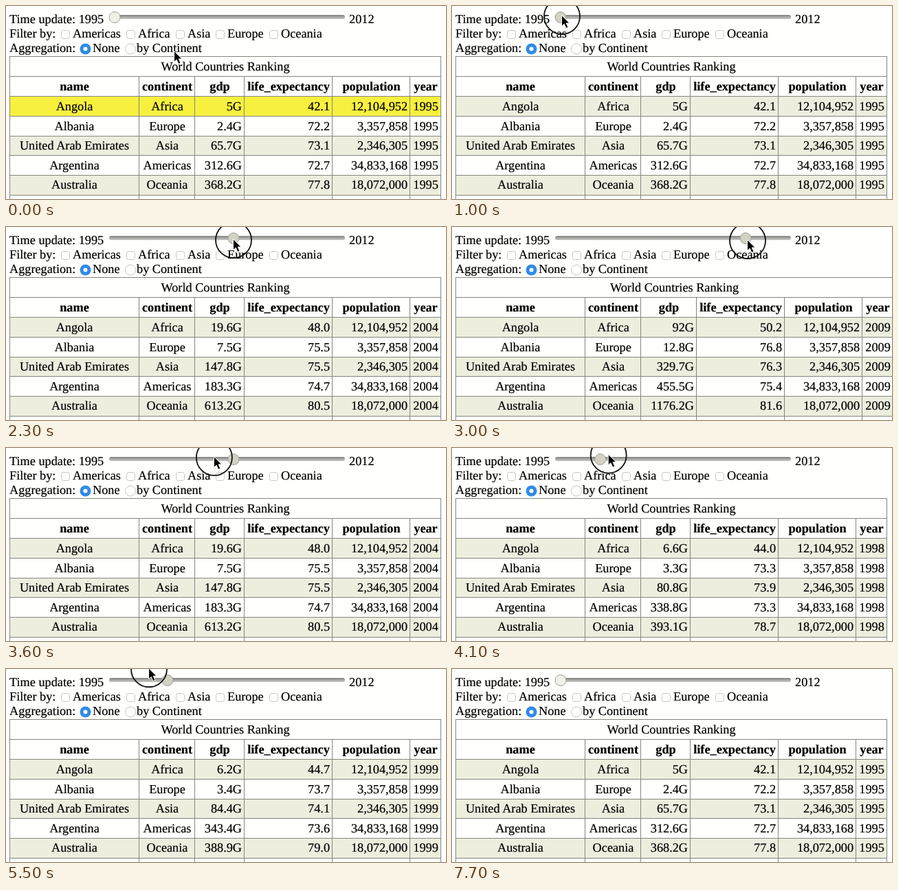
These frames come from a looping animation (640 by 281 pixels, 7.8 s). An HTML page:

```html
<!DOCTYPE html>
<html lang="en">
<head>
<meta charset="utf-8">
<title>World Countries Ranking</title>
<style>
  html, body { margin: 0; width: 100%; height: 100%; overflow: hidden; background: #fffffd; }
  svg { display: block; width: 640px; height: 281px; }
  text {
    font: 18.25px "Liberation Serif", "Times New Roman", Times, serif;
    text-rendering: geometricPrecision; stroke: #000; stroke-width: .2;
  }
  .bold { font-weight: bold; }
  .line { stroke: #85857f; fill: none; shape-rendering: crispEdges; }
  .box { fill: #fffffd; stroke: #c8c8c0; }
</style>
</head>
<body>
<svg id="stage" viewBox="0 0 640 281">
  <defs>
    <linearGradient id="groove" x1="0" y1="0" x2="0" y2="1">
      <stop offset="0" stop-color="#7c7c7a"/>
      <stop offset=".5" stop-color="#a9a9a6"/>
      <stop offset="1" stop-color="#c6c6c2"/>
    </linearGradient>
  </defs>
</svg>
<script>
const LOOP = 7800, STEP = 100;
const PRESS = 700, RELEASE = 6300;
const FIRST_YEAR = 1995, SLIDER_X = 158, YEAR_W = 19.22;
const ROW_H = 28.6;
const WIDE = 9; // extra width of the gdp column for four-digit values

// gdp at the key years; life expectancy rises from one value to the other by 2008
const keyYears = [1995, 1996, 1999, 2004, 2008, 2012];
const countries = [
  { name: "Angola", continent: "Africa", population: "12,104,952",
    gdp: [5, 7.5, 6.2, 19.6, 84.2, 115.3], life: [42.1, 49.8] },
  { name: "Albania", continent: "Europe", population: "3,357,858",
    gdp: [2.4, 3, 3.4, 7.5, 12.9, 12.3], life: [72.2, 76.6] },
  { name: "United Arab Emirates", continent: "Asia", population: "2,346,305",
    gdp: [65.7, 73.6, 84.4, 147.8, 315.5, 372.3], life: [73.1, 76.2] },
  { name: "Argentina", continent: "Americas", population: "34,833,168",
    gdp: [312.6, 329.7, 343.4, 183.3, 406, 604], life: [72.7, 75.3] },
  { name: "Australia", continent: "Oceania", population: "18,072,000",
    gdp: [368.2, 401.6, 388.9, 613.2, 1055.5, 1538.2], life: [77.8, 81.4] }
];

// Turning points and rests of the pointer, eased in between
const path = [
  { t: 0, x: 245, y: 67 },
  { t: 700, x: 160, y: 16 },
  { t: 1600, x: 160, y: 12 },
  { t: 2300, x: 331, y: 19 },
  { t: 2500, x: 331, y: 19 },
  { t: 3000, x: 430, y: 20 },
  { t: 4050, x: 222, y: 10 },
  { t: 4500, x: 412, y: 28 },
  { t: 4700, x: 412, y: 28 },
  { t: 5900, x: 140, y: -9 },
  { t: 6300, x: 120, y: -40 }
];

const stage = document.getElementById("stage");
const mix = (a, b, f) => a + (b - a) * f;
const ease = f => (1 - Math.cos(Math.PI * f)) / 2;

function add(tag, attrs, parent = stage) {
  const el = document.createElementNS("http://www.w3.org/2000/svg", tag);
  for (const key in attrs) el.setAttribute(key, attrs[key]);
  parent.appendChild(el);
  return el;
}

function label(str, x, y, anchor = "start", parent = stage, cls = "") {
  const el = add("text", { x, y, "text-anchor": anchor, class: cls }, parent);
  el.textContent = str;
  return el;
}

// Controls
label("Time update: 1995", 5, 24.5);
label("2012", 499, 24.5);
add("rect", { x: 150, y: 13, width: 343, height: 6, rx: 3, fill: "url(#groove)" });
const thumb = add("circle", { cy: 16.5, r: 8, stroke: "#a0a09a" });

label("Filter by:", 5, 46);
[["Americas", 80], ["Africa", 175], ["Asia", 247], ["Europe", 305], ["Oceania", 383]].forEach(([str, x]) => {
  add("rect", { x: x + .5, y: 35.5, width: 12, height: 12, rx: 3, class: "box" });
  label(str, x + 17, 46);
});

label("Aggregation:", 5, 67);
add("circle", { cx: 115.5, cy: 62.5, r: 8, fill: "#2f8be6" });
add("circle", { cx: 115.5, cy: 62.5, r: 3, fill: "#fff" });
label("None", 126, 67);
add("circle", { cx: 181, cy: 62.5, r: 7.5, class: "box" });
label("by Continent", 190, 67);

// Table
const bands = countries.map((c, i) => add("rect", { x: 5, y: 132 + ROW_H * i, height: ROW_H }));
const lines = add("path", { class: "line" });
const caption = label("World Countries Ranking", 319, 94, "middle");
const fixed = add("g", {});
const sliding = add("g", {});

label("name", 99.5, 123, "middle", fixed, "bold");
label("continent", 234.5, 123, "middle", fixed, "bold");
const gdpHead = label("gdp", 311, 123, "middle", fixed, "bold");
label("life_expectancy", 411, 123, "middle", sliding, "bold");
label("population", 531.5, 123, "middle", sliding, "bold");
label("year", 610.5, 123, "middle", sliding, "bold");

const cells = countries.map((c, i) => {
  const y = 152 + 28.5 * i;
  label(c.name, 99.5, y, "middle", fixed);
  label(c.continent, 234.5, y, "middle", fixed);
  label(c.population, 584, y, "end", sliding);
  return {
    gdp: label("", 343, y, "end", sliding),
    life: label("", 471, y, "end", sliding),
    year: label("", 610.5, y, "middle", sliding)
  };
});

// Pointer
const pointer = add("g", {});
const ring = add("circle", { r: 26, fill: "none", stroke: "#111", "stroke-width": 1.8 }, pointer);
add("path", { d: "M-.5-1.5V14.5L3.2 11.2L6 17.4L9 16L6.2 10H11Z", stroke: "#fff" }, pointer);

function pointerAt(t) {
  const i = path.findIndex(p => p.t > t);
  if (i < 0) return path[path.length - 1];
  const a = path[i - 1], b = path[i];
  const f = ease((t - a.t) / (b.t - a.t));
  return { x: mix(a.x, b.x, f), y: mix(a.y, b.y, f) };
}

// The slider follows the pointer one step late
function yearAt(t) {
  if (t <= PRESS || t >= RELEASE) return FIRST_YEAR;
  const n = Math.round((pointerAt(t - STEP).x - SLIDER_X) / YEAR_W);
  return FIRST_YEAR + Math.max(0, Math.min(17, n));
}

function gdpAt(c, year) {
  const i = Math.max(1, keyYears.findIndex(y => y >= year));
  const f = (year - keyYears[i - 1]) / (keyYears[i] - keyYears[i - 1]);
  return mix(c.gdp[i - 1], c.gdp[i], f);
}

function lifeAt(c, year) {
  const f = (year - FIRST_YEAR) / 13;
  return mix(c.life[0], c.life[1], f + .12 * f * Math.sin(Math.PI * f));
}

function drawTable(year, hover) {
  const gdps = countries.map(c => gdpAt(c, year));
  const shift = Math.max(...gdps) >= 1000 ? WIDE : 0;
  const right = 633 + shift;

  countries.forEach((c, i) => {
    cells[i].gdp.textContent = +gdps[i].toFixed(1) + "G";
    cells[i].life.textContent = lifeAt(c, year).toFixed(1);
    cells[i].year.textContent = year;
    bands[i].setAttribute("width", right - 5);
    bands[i].setAttribute("fill", hover && i === 0 ? "#f8f03f" : i % 2 ? "#fffffd" : "#eeeedf");
  });

  sliding.setAttribute("transform", `translate(${shift} 0)`);
  caption.setAttribute("x", 319 + shift / 2);
  gdpHead.setAttribute("x", 311 + shift / 2);

  let d = `M5.5 73V281M${right - .5} 73V281`;
  for (let i = 0; i < 8; i++) d += `M5 ${Math.round(73.3 + 28.8 * i) + .5}H${right}`;
  [193, 274, 346 + shift, 474 + shift, 587 + shift].forEach(x => d += `M${x + .5} 102V281`);
  lines.setAttribute("d", d);
}

function draw(ms) {
  const t = Math.floor((ms % LOOP) / STEP) * STEP;
  const pressed = t >= PRESS && t < RELEASE;
  const year = yearAt(t);
  const { x, y } = pointerAt(t);
  drawTable(year, t === 0);
  thumb.setAttribute("cx", SLIDER_X + (year - FIRST_YEAR) * YEAR_W);
  thumb.setAttribute("fill", pressed ? "#d2d1c2" : "#f0f0e8");
  ring.setAttribute("visibility", pressed ? "visible" : "hidden");
  pointer.setAttribute("transform", `translate(${x} ${y})`);
}

const start = performance.now();
function tick() {
  draw(performance.now() - start);
  requestAnimationFrame(tick);
}
tick();
</script>
</body>
</html>
```
